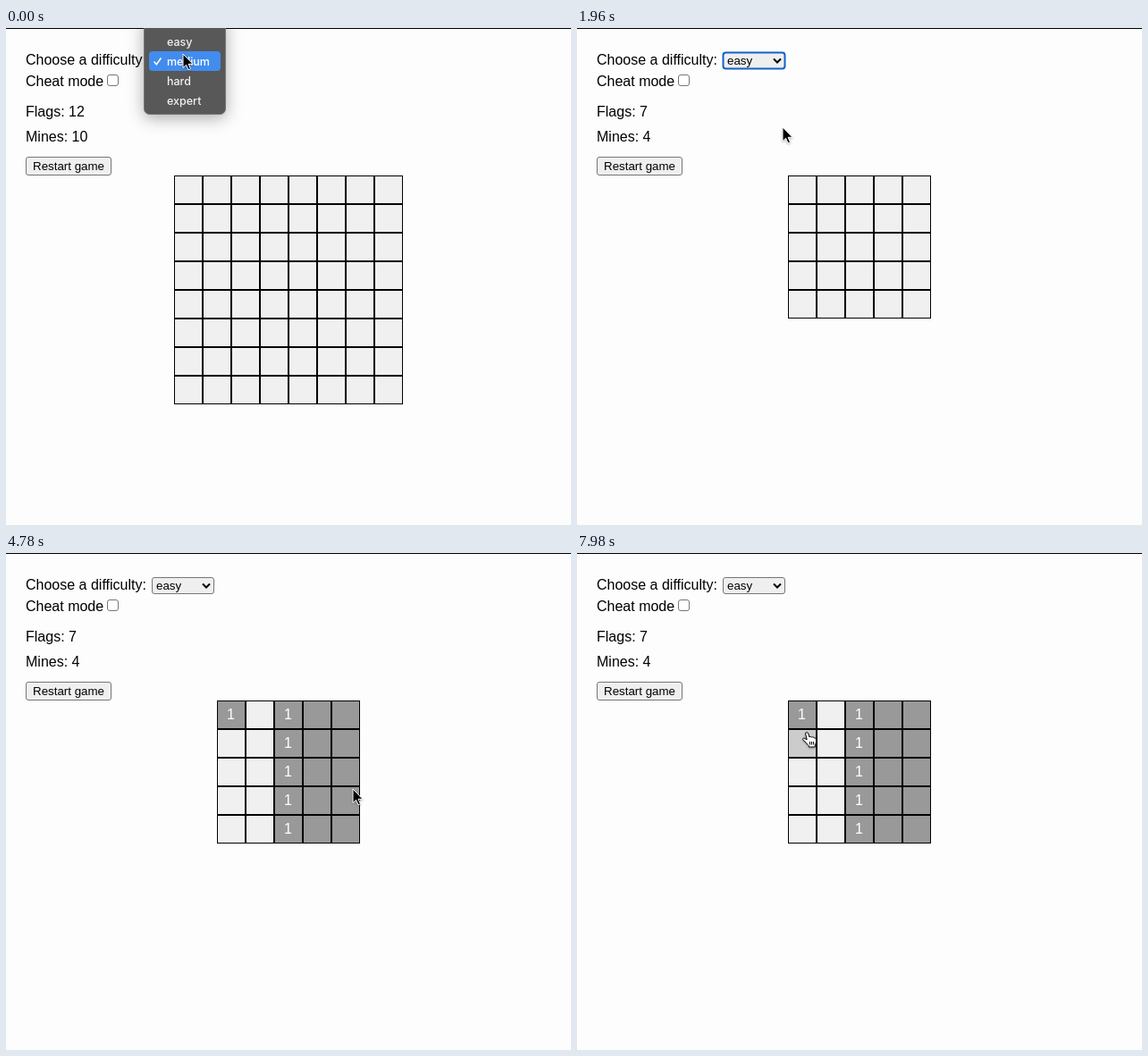
An HTML page that plays this animation: 632 px wide and 556 px high, repeating every 8 s.

```html
<!DOCTYPE html>
<html lang="en">
<head>
<meta charset="utf-8">
<title>Minesweeper</title>
<style>
  html, body { margin: 0; width: 100%; height: 100%; overflow: hidden; background: #fdfdfd; }
  svg { display: block; width: 632px; height: 556px; }
  text { font: 16px "Liberation Sans", Arial, sans-serif; fill: #000; white-space: pre; }
  .ui { font-size: 13.333px; }
  .control { fill: #efefef; stroke: #767676; }
  .cell { fill: #f0f0f0; stroke: #000; }
  .cell.hover { fill: #ccc; }
  .cell.open { fill: #999; }
  .num { fill: #fff; text-anchor: middle; }
  #popup { filter: drop-shadow(0 4px 9px rgba(0, 0, 0, .32)); }
  #popup text { font: 500 12.5px Inter, sans-serif; fill: #f2f2f2; }
  #popup text.on { fill: #fff; }
  #cursor { filter: drop-shadow(0 1px 1px rgba(0, 0, 0, .3)); }
</style>
</head>
<body>
<svg viewBox="0 0 632 556">
  <rect width="632" height="1"/>
  <text x="22" y="41">Choose a difficulty:</text>
  <text x="22" y="65">Cheat mode</text>
  <rect x="113.5" y="52.5" width="12" height="12" rx="2.5" fill="#fff" stroke="#767676"/>
  <text id="flags" x="22" y="99"></text>
  <text id="mines" x="22" y="127"></text>
  <rect class="control" x="22.5" y="144.5" width="95" height="20" rx="2.5"/>
  <text class="ui" x="30" y="159">Restart game</text>

  <g id="large"></g>
  <g id="small"></g>

  <g id="popup">
    <rect x="154.5" y="-12" width="91" height="108.5" rx="6" fill="#585858" stroke="#757575"/>
    <rect id="mark" x="160" width="80" height="22" rx="4" fill="#418cee"/>
    <path d="M165.5 37.5 168.3 40.7 173.5 33.5" fill="none" stroke="#fff" stroke-width="1.6"/>
  </g>

  <g id="select">
    <rect class="control" x="163.5" y="27.5" width="69" height="18" rx="2.5"/>
    <text id="level" class="ui" x="168" y="41"></text>
    <path d="M220 34.5 224 38.5 228 34.5" fill="none" stroke="#000" stroke-width="2"/>
    <rect id="ring" x="163.5" y="27.5" width="69" height="18" rx="3" fill="none" stroke="#1060cc" stroke-width="2"/>
  </g>

  <g id="cursor">
    <path id="arrow" d="M0 0V15.6L3.6 12.3 6 17.8 8.5 16.7 6.1 11.3H11Z" stroke="#fff"/>
    <g id="hand" transform="translate(-5 -1)" stroke="#000" stroke-linejoin="round">
      <path fill="#fff" d="M3.6 2C3.7.4 6 .2 6.6 1.7L8 6C9 5.2 10.2 5.4 10.7 6.2 11.7 5.6 12.8 5.9 13.2 6.9 14.6 6.5 15.3 7.4 15.4 8.5L15.5 11C15.5 13 14.4 14 14.2 15.2V17H7.4L7.2 15.6C5.6 14.3 4 11.6 1 9.2-.2 7.9 1.4 6.4 2.9 7.4L5.2 9Z"/>
      <path fill="none" d="M8.6 11V14.5M10.6 11V14.5M12.6 11V14.5"/>
    </g>
  </g>
</svg>
<script>
const LOOP = 8000, CELL = 32, TOP = 165, LEFT = 236, HOVER_LAG = 100;
const CLOSE = 1440, START = 1660, BLUR = 3100, FIRST = 3380, SECOND = 4740;
const $ = id => document.getElementById(id);
const clamp = (v, lo, hi) => Math.max(lo, Math.min(hi, v));

// pointer strokes: begin, end, x, y
const strokes = [
  [20, 820, 200, 16],       // up to "easy"
  [1360, 1560, 233, 75],
  [1660, 2400, 229, 130],
  [2500, 2920, 247, 181],   // first cell
  [FIRST, 3800, 384, 289],
  [3900, 4180, 388, 264],   // second cell
  [5440, 6020, 357, 256],
  [6320, 6860, 260, 255],
  [7280, 7540, 257, 243],
  [7680, 7980, 257, 201]
];

// every stroke starts fast and slows down
function pointer(t) {
  let x = 198, y = 29;
  for (const [begin, end, toX, toY] of strokes) {
    const k = 1 - (1 - clamp((t - begin) / (end - begin), 0, 1)) ** 2;
    x += (toX - x) * k;
    y += (toY - y) * k;
  }
  return [x, y];
}

function add(parent, tag, attrs, label = '') {
  const el = document.createElementNS('http://www.w3.org/2000/svg', tag);
  for (const key in attrs) el.setAttribute(key, attrs[key]);
  el.textContent = label;
  return parent.appendChild(el);
}

function board(parent, size, left) {
  return Array.from({ length: size * size }, (_, i) => {
    const col = i % size, row = Math.floor(i / size);
    const x = left + col * CELL, y = TOP + row * CELL;
    const box = add(parent, 'rect', { x: x + .5, y: y + .5, width: CELL - 1, height: CELL - 1, class: 'cell' });
    const num = add(parent, 'text', { x: x + 15.5, y: y + 21, class: 'num' });
    return { col, row, box, num };
  });
}

board($('large'), 8, 188);
const cells = board($('small'), 5, LEFT);
const items = ['easy', 'medium', 'hard', 'expert'].map((name, i) =>
  add($('popup'), 'text', { x: 180, y: 19.5 + i * 22 }, name));

const show = (el, on) => el.style.display = on ? '' : 'none';
const isOpen = (c, t) => c.col + c.row === 0 ? t >= FIRST : c.col > 1 && t >= SECOND;

function cellAt([x, y]) {
  const col = Math.floor((x - LEFT) / CELL), row = Math.floor((y - TOP) / CELL);
  return cells.find(c => c.col === col && c.row === row);
}

function render(t) {
  const [x, y] = pointer(t);
  const easy = t >= START;

  $('flags').textContent = 'Flags: ' + (easy ? 7 : 12);
  $('mines').textContent = 'Mines: ' + (easy ? 4 : 10);
  $('level').textContent = easy ? 'easy' : 'medium';
  show($('large'), !easy);
  show($('small'), easy);

  const active = t < CLOSE ? clamp(Math.round((y - 15) / 22), 0, 3) : 0;
  $('mark').setAttribute('y', 4 + active * 22);
  items.forEach((el, i) => el.classList.toggle('on', i === active));
  $('popup').style.opacity = clamp(1 - (t - CLOSE) / 150, .22, 1);
  show($('popup'), !easy);
  show($('select'), t >= CLOSE);
  show($('ring'), easy && t < BLUR);

  const under = easy && cellAt(pointer(t));
  const hovered = easy && cellAt(pointer(t - HOVER_LAG));
  for (const c of cells) {
    const open = isOpen(c, t);
    c.box.classList.toggle('open', open);
    c.box.classList.toggle('hover', !open && c === hovered);
    c.num.textContent = open && c.col < 3 ? '1' : '';
  }
  const clickable = under && !isOpen(under, t);
  show($('hand'), clickable);
  show($('arrow'), !clickable);
  $('cursor').setAttribute('transform', `translate(${Math.round(x)} ${Math.round(y)})`);
}

const begin = performance.now();
function tick() {
  render((performance.now() - begin) % LOOP);
  requestAnimationFrame(tick);
}
tick();
</script>
</body>
</html>
```
